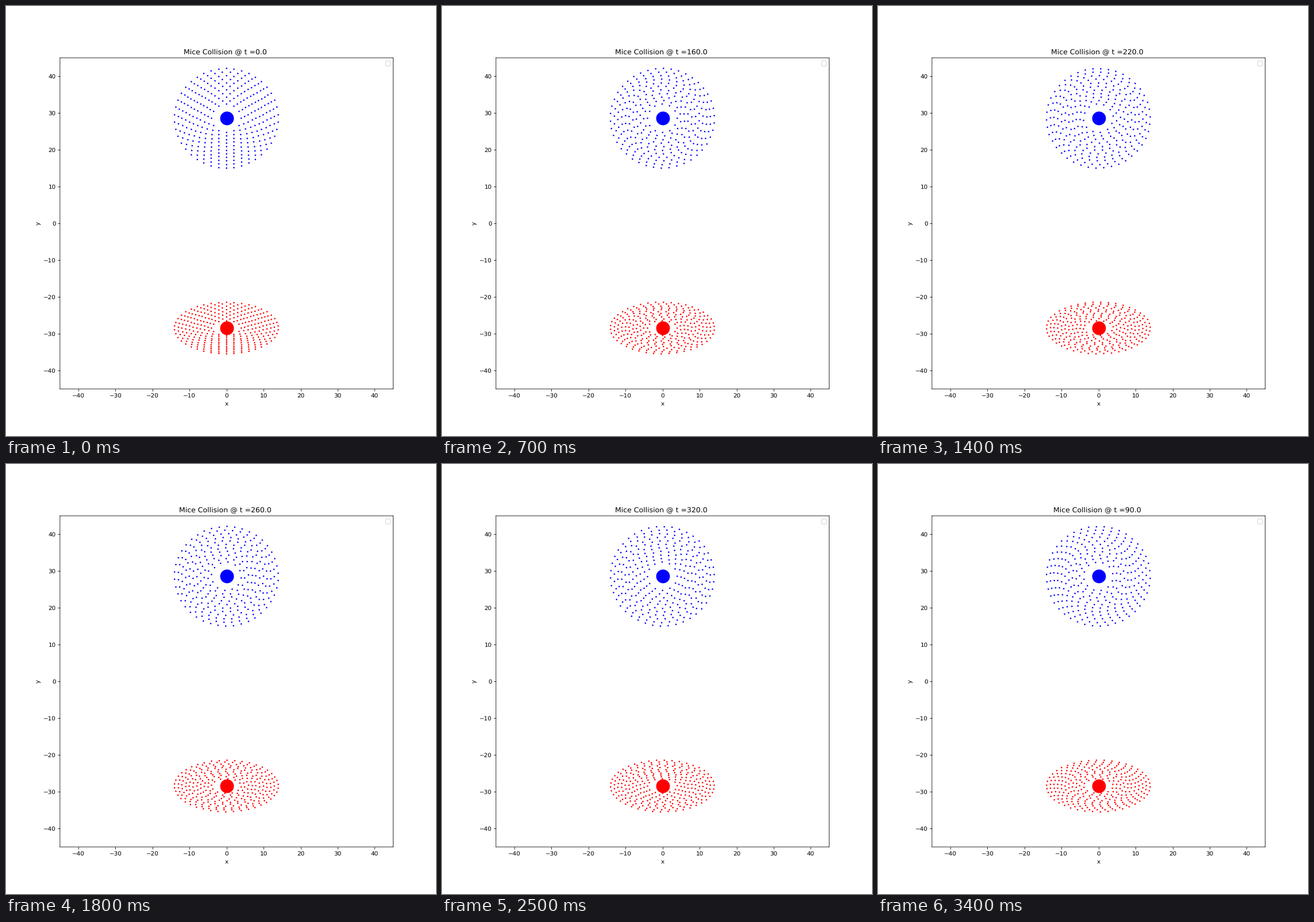
A matplotlib script that plays this animation: 748x748 px, repeating every 3500 ms.

```python
import numpy as np
import matplotlib.pyplot as plt
from matplotlib.animation import FuncAnimation

plt.rcParams["text.hinting"] = "no_hinting"

STEPS = 35
DT = 10.0
GM = 2.0
RADII = range(4, 15)
CORE, STAR = 23, 2.5  # diameters in points
GRID_X, GRID_Y = 775 / 90, 770 / 90  # raster cells per data unit

# Snapshots play in text order: 0, 10..19, 1, 20..29, 2, ...
ORDER = sorted(range(STEPS), key=lambda k: f"{k}_")

# Each ring holds three particles per unit of radius, starting at the bottom.
r = np.concatenate([np.full(3 * n, float(n)) for n in RADII])
phase = np.concatenate([2 * np.pi * np.arange(3 * n) / (3 * n) for n in RADII])
phase -= np.pi / 2
omega = np.sqrt(GM / r**3)

# colour, centre height, inclination in degrees
GALAXIES = [("blue", 28.5, 15), ("red", -28.5, 60)]


def snap(x, y):
    """Put points on the raster the particles live on."""
    x = np.floor(GRID_X * x + 1e-6) / GRID_X
    y = (np.ceil(GRID_Y * y - 0.5) + 0.5) / GRID_Y
    return np.column_stack([x, y])


def dots(points, size, color):
    # One size per point keeps the dots at sub-pixel positions.
    return ax.scatter(*points.T, s=np.full(len(points), size**2),
                      color=color, lw=0)


fig, ax = plt.subplots(figsize=(10, 10), dpi=74.8)
fig.subplots_adjust(left=0.1255, right=0.9005, bottom=0.1095, top=0.8795)
ax.set(xlim=(-45, 45), ylim=(-45, 45), xlabel="x", ylabel="y")
ax.set_xticks(range(-40, 41, 10))
ax.set_yticks(range(-40, 41, 10))
for spine in ax.spines.values():
    spine.set_snap(False)
ax.legend(handles=[], loc="upper right")
title = ax.set_title("")

disks = []
for color, height, tilt in GALAXIES:
    core = snap(np.zeros(2), np.full(2, height))[:1]
    dots(core, CORE, color)
    disk = dots(np.zeros((len(r), 2)), STAR, color)
    disks.append((disk, height, np.cos(np.radians(tilt))))


def update(i):
    t = ORDER[i] * DT
    angle = phase + omega * t
    x, y = r * np.cos(angle), r * np.sin(angle)
    for disk, height, squash in disks:
        disk.set_offsets(snap(x, height + squash * y))
    title.set_text(f"Mice Collision @ t ={t} ")
    return [title] + [d[0] for d in disks]


anim = FuncAnimation(fig, update, frames=STEPS, interval=100,
                     repeat=True, repeat_delay=0)
plt.show()
```
